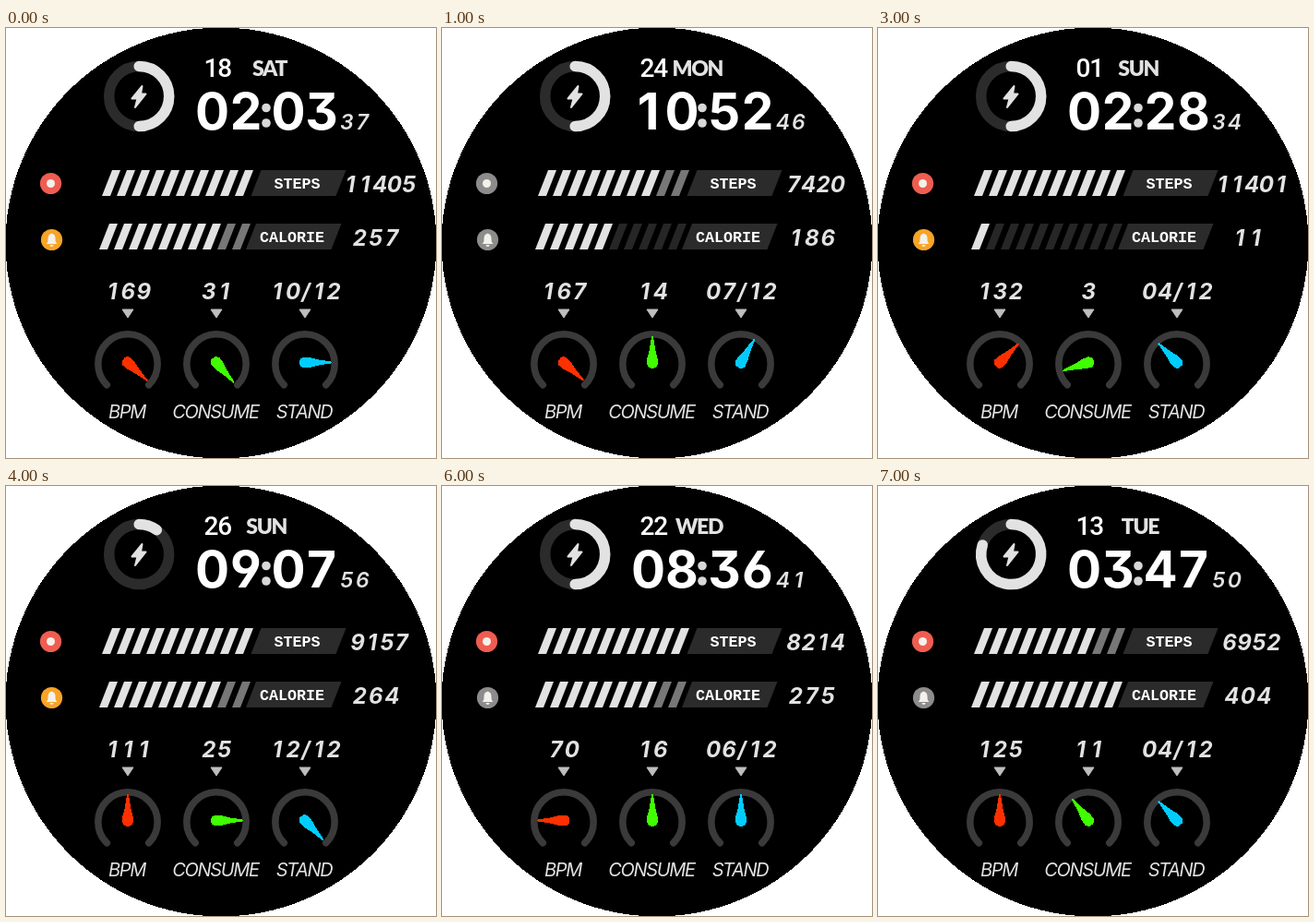
An HTML page for the animation above (8 s loop, 466 by 466 pixels).

```html
<!DOCTYPE html>
<html lang="en">
<head>
<meta charset="utf-8">
<title>Watch face</title>
<style>
  html, body { margin: 0; width: 100%; height: 100%; overflow: hidden; background: #fff; }
  svg { display: block; width: 466px; height: 466px; }
  text { text-anchor: middle; fill: #e2e2e2; }
  .time { font: 700 55px Inter, sans-serif; font-feature-settings: "cv03", "cv04", "cv09"; fill: #fff; }
  .date { font: 500 28px Roboto, sans-serif; font-stretch: 85%; fill: #fff; }
  .day { font: 900 23px Lato, sans-serif; letter-spacing: -1.4px; text-anchor: end; }
  .sec { font: italic 600 23px Inter, sans-serif; }
  .num { font: italic 700 24px Inter, sans-serif; }
  .name { font: italic 400 20px Inter, sans-serif; letter-spacing: -1.3px; }
  .tag { font: 700 16.7px "Liberation Mono", monospace; fill: #fff; }
  .ring { fill: none; stroke-linecap: round; }
  .crisp { shape-rendering: crispEdges; }
</style>
</head>
<body>
<svg viewBox="0 0 466 466">
  <circle class="crisp" cx="233" cy="233" r="233.5"/>
  <g id="fixed"></g>
  <g id="live"></g>
</svg>
<script>
const STEP = 1000;
const LIT = '#e2e2e2', HALF = '#777', DIM = '#262626', PANEL = '#2b2b2b';
const GAUGES = [
  { x: 132, name: 'BPM', color: '#ff3000' },
  { x: 228, name: 'CONSUME', color: '#40ff00' },
  { x: 324, name: 'STAND', color: '#00ccff' }
];

// date, day, time, seconds, battery, link on, bell on,
// steps, step bars, calories, calorie bars, gauge values, needle angles
const STATES = [
  ['18', 'SAT', '02:03', '37', .5, 1, 1, '11405', 10, '257', 8, ['169', '31', '10/12'], [133, 139, 90]],
  ['24', 'MON', '10:52', '46', .5, 0, 0, '7420', 8, '186', 5, ['167', '14', '07/12'], [132, 0, 30]],
  ['17', 'THU', '13:47', '28', .1, 1, 1, '6553', 5, '322', 10, ['110', '2', '02/12'], [0, -116, -90]],
  ['01', 'SUN', '02:28', '34', .5, 1, 1, '11401', 10, '11', 1, ['132', '3', '04/12'], [45, -108, -44]],
  ['26', 'SUN', '09:07', '56', .1, 1, 1, '9157', 10, '264', 8, ['111', '25', '12/12'], [0, 90, 137]],
  ['15', 'SAT', '17:14', '25', .8, 0, 0, '11579', 10, '333', 10, ['67', '20', '05/12'], [-90, 44, -19]],
  ['22', 'WED', '08:36', '41', .5, 1, 0, '8214', 10, '275', 8, ['70', '16', '06/12'], [-90, 0, 0]],
  ['13', 'TUE', '03:47', '50', .8, 1, 0, '6952', 8, '404', 10, ['125', '11', '04/12'], [0, -37, -44]]
];

const text = (cls, x, y, s) => `<text class="${cls}" x="${x}" y="${y}">${s}</text>`;
const shape = (d, fill, more = '') => `<path d="${d}" fill="${fill}" ${more}/>`;
const disc = (x, y, r, fill) => `<circle cx="${x}" cy="${y}" r="${r}" fill="${fill}"/>`;

// Evenly spaced characters around a centre
const spaced = (cls, cx, y, s, pitch) =>
  [...s].map((c, i) => text(cls, cx + (i - (s.length - 1) / 2) * pitch, y, c)).join('');

const slant = (x, y, w, fill) =>
  shape(`M${x} ${y + 28}l11-28h${w}l-11 28z`, fill);

// Clockwise arc, angles in degrees from the top
function arc(cx, cy, r, from, to, color, width) {
  const at = a => {
    const t = a * Math.PI / 180;
    return `${cx + r * Math.sin(t)} ${cy - r * Math.cos(t)}`;
  };
  return `<path class="ring" d="M${at(from)}A${r} ${r} 0 ${to - from > 180 ? 1 : 0} 1 ${at(to)}" stroke="${color}" stroke-width="${width}"/>`;
}

function bars(x, y, count) {
  let out = '';
  for (let i = 0; i < 10; i++) {
    out += slant(x + i * 16, y, 9, i < count ? LIT : count === 8 ? HALF : DIM);
  }
  return out;
}

function bell(on) {
  return disc(49.5, 229.5, 11.6, on ? '#f7a428' : '#8c8c8c') +
    shape('M43.5 234c2-2 2-3 2-6 0-3 1.5-4.5 3.2-5a.9.9 0 0 1 1.6 0c1.7.5 3.2 2 3.2 5 0 3 0 4 2 6z', '#f4f1ec') +
    shape('M47.5 235h4a2 2 0 0 1-4 0z', '#f4f1ec');
}

function needle(x, angle, color) {
  return shape('M-.8-29L-3.2-14-5.5-5-6 2-4 5-2 6H2L4 5 6 2 5.5-5 3.2-14 .8-29z', color,
    `class="crisp" transform="translate(${x} 362.5) rotate(${angle})"`);
}

function value(x, s) {
  if (!s.includes('/')) return spaced('num', x + .3, 293.5, s, 17);
  const offsets = [-30, -13, 1, 15, 31];
  return [...s].map((c, i) => text('num', x + offsets[i], 293.5, c)).join('');
}

function fixed() {
  return `<circle class="ring" cx="144.2" cy="74" r="32.5" stroke="${PANEL}" stroke-width="11.5"/>` +
    shape('M147.5 63L136.5 76.5H142.500L140 86 151.5 71.5H146z', LIT,
      `stroke="${LIT}" stroke-width="2" stroke-linejoin="round"`) +
    disc(282, 86.5, 4.8, '#d8d8d8') + disc(282, 103, 4.8, '#d8d8d8') +
    slant(265.5, 154, 92, PANEL) + text('tag', 315.5, 174, 'STEPS') +
    slant(260, 212, 92.5, PANEL) + text('tag', 310, 232, 'CALORIE') +
    GAUGES.map(g =>
      arc(g.x, 364, 32.2, -135, 135, '#3a3a3a', 7.5) +
      shape(`M${g.x - 6} 305h12l-6 9z`, '#bebebe', 'stroke="#bebebe" stroke-linejoin="round"') +
      text('name', g.x - 1, 423, g.name)).join('');
}

function face([date, day, time, sec, power, link, alarm, steps, stepBars, cal, calBars, values, angles]) {
  const cells = [223.5, 260, 0, 306, 342];
  return arc(144.2, 74, 32.5, 0, power * 360, LIT, 11.5) +
    spaced('date', 229.8, 53, date, 14.6) +
    text('day', 304, 52, day) +
    [...time].map((c, i) => c === ':' ? '' : text('time', cells[i], 110, c)).join('') +
    spaced('sec', 377.8, 110, sec, 17) +
    disc(48.5, 168.5, 11.6, link ? '#ef5d50' : '#8c8c8c') + disc(48.5, 168.5, 4.5, '#f4f1ec') +
    bell(alarm) +
    bars(104, 154, stepBars) + spaced('num', 405, 177.5, steps, 15.9) +
    bars(101, 212, calBars) + spaced('num', 400.8, 235.5, cal, 17.5) +
    GAUGES.map((g, i) => value(g.x, values[i]) + needle(g.x, angles[i], g.color)).join('');
}

const live = document.getElementById('live');
const start = performance.now();
let shown = -1;

function tick() {
  const i = Math.floor((performance.now() - start) / STEP) % STATES.length;
  if (i !== shown) live.innerHTML = face(STATES[shown = i]);
  requestAnimationFrame(tick);
}

document.getElementById('fixed').innerHTML = fixed();
tick();
</script>
</body>
</html>
```
